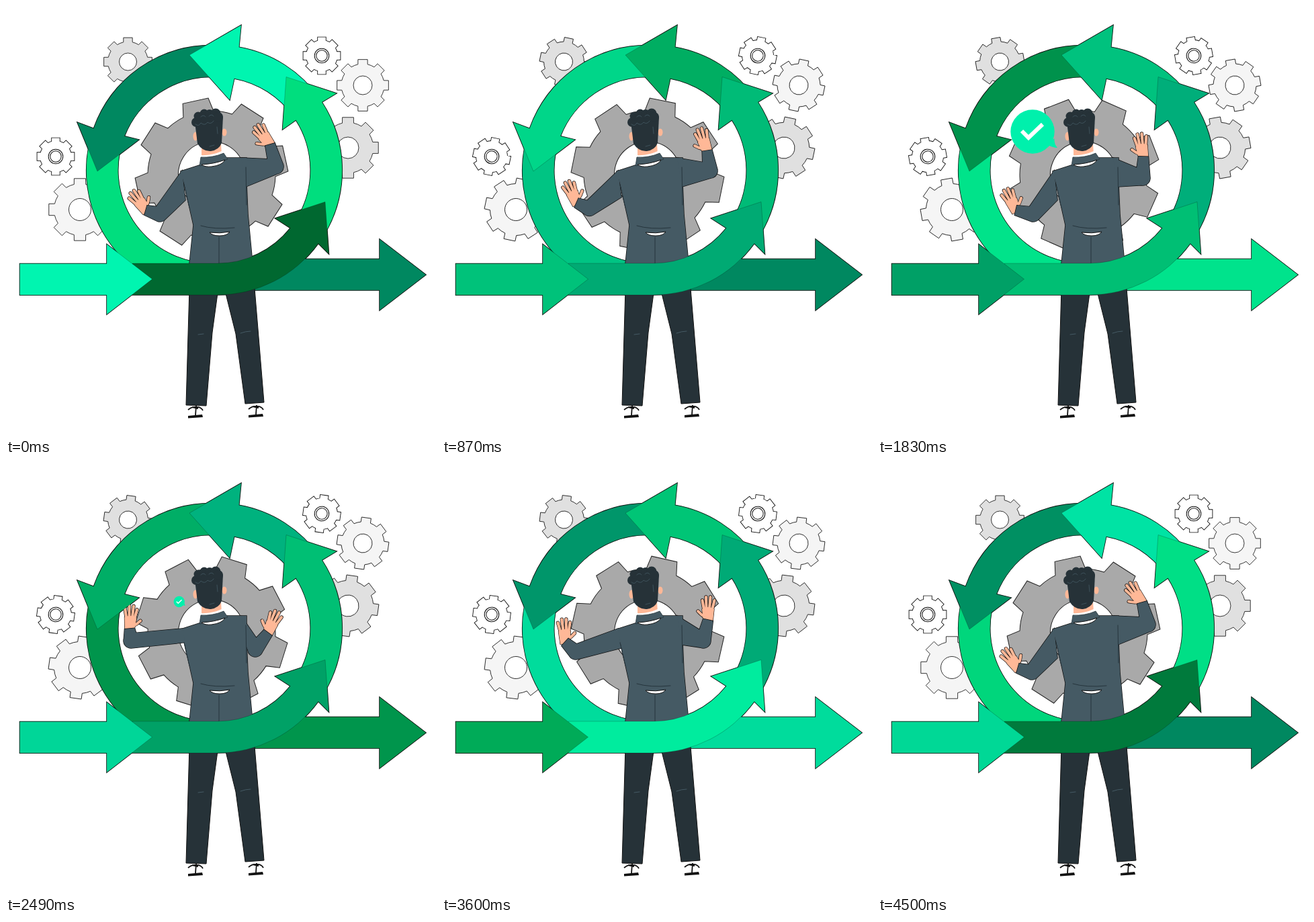
An HTML page for the animation above (4530 ms loop, 640x640 px).

```html
<!DOCTYPE html>
<html lang="en">
<head>
<meta charset="utf-8">
<title>Agile loop</title>
<style>
html, body { margin: 0; width: 100%; height: 100%; overflow: hidden; background: #fff; }
svg { display: block; width: 100vw; height: 100vh; }
.line { fill: none; stroke: #26353d; stroke-width: 1; stroke-linecap: round; }
.edge { fill: #111; stroke: #111; stroke-width: 1.5; stroke-linejoin: miter; }
.arrow { stroke: rgba(0, 0, 0, .3); stroke-width: .7; }
.suit { fill: #455a64; }
.skin { fill: #ffb897; stroke: #ffb897; }
.rim { fill: #111; stroke: #111; }
</style>
</head>
<body>
<svg viewBox="0 0 640 640">
  <defs>
    <path id="torso" d="M260 246 L288 237 L329 226 L358 226 L358 262 L360 310 L367 384 L273 384 L279 326 L266 268Z"/>
    <path id="armL"/>
    <path id="armR"/>
    <path id="palm" d="M-7 3 L7 3 L9 -16 Q0 -22 -9 -16Z"/>
    <path id="fingers" fill="none" stroke-linecap="round" stroke-linejoin="round"
      d="M-6 -15 L-9.5 -29 M-2 -17 L-3.5 -34 M2.5 -17 L3 -34 M6 -15 L8.5 -29 M4 -4 Q10 -7 15 -13"/>
    <g id="hand">
      <g class="rim"><use href="#palm" stroke-width="1.2"/><use href="#fingers" stroke-width="5.4"/></g>
      <g class="skin"><use href="#palm" stroke-width="0"/><use href="#fingers" stroke-width="4"/></g>
    </g>
    <g id="shoe">
      <path d="M-11 -8 Q-5 -13 0 -12 Q8 -13 11 -7 M1 -14 L0 0 M-5 -12 L4 -10" fill="none" stroke="#111" stroke-width="1.8"/>
      <path d="M-11 1 L10 -1 L11 3 L-11 4.5Z" fill="#111"/>
    </g>
  </defs>

  <g id="gears"></g>

  <g id="bubble">
    <path d="M-15 -5 Q-7 0 0 0 Q-5 -5 -4.5 -14Z" fill="#00f0ac"/>
    <circle cx="-37" cy="-24" r="32.7" fill="#00f0ac"/>
    <path d="M-53 -25 L-43 -15 L-22 -35" fill="none" stroke="#fff" stroke-width="6"/>
  </g>

  <g id="back"></g>

  <g id="man">
    <g fill="#263238" stroke="#111" stroke-width="1">
      <path d="M273 420 H316 L307 486 L298 595 L268 594Z"/>
      <path d="M325 420 H370 L384 590 L356 592 L342 488Z"/>
    </g>
    <path class="line" style="stroke:#455a64" d="M286 489 L294 488 M349 487 Q357 484 364 484"/>
    <use href="#shoe" x="282" y="609"/>
    <use href="#shoe" x="372" y="608"/>

    <use href="#hand" id="handL"/>
    <use href="#hand" id="handR"/>
    <g class="edge"><use href="#torso"/><use href="#armL"/><use href="#armR"/></g>
    <g class="suit"><use href="#torso"/><use href="#armL"/><use href="#armR"/></g>
    <path class="line" d="M265 266 Q269 285 273 300 M357 240 L358 296 M290 327 Q310 333 340 330 M317 344 L317 383"/>
    <path d="M303 337 Q318 339 333 336 Q329 342 318 342 Q307 342 303 337Z" fill="#fff" stroke="#111"/>

    <path d="M291 204 L320 204 L321 222 L291 226Z" fill="#ffb897"/>
    <path d="M289 222 Q306 223 321 216 L324 221 L288 230Z" fill="#fff"/>
    <path d="M290 225 Q308 226 324 219 L330 228 Q312 235 288 238Z" fill="#455a64" stroke="#26353d" stroke-width=".8"/>
    <path d="M291 236 Q310 235 326 229 Q322 237 306 239 Q296 240 291 236Z" fill="#fff" stroke="#111"/>
    <g fill="#ffb897">
      <ellipse cx="282" cy="194" rx="3.5" ry="6.5"/>
      <ellipse cx="325" cy="188" rx="3.5" ry="5.5"/>
    </g>
    <g fill="#263238">
      <path d="M281 172 L285 205 Q293 217 305 216 Q317 214 321 204 L323 165 Q318 154 308 156Z"/>
      <circle cx="283" cy="173" r="7"/><circle cx="286" cy="164" r="6.5"/>
      <circle cx="295" cy="160" r="6.5"/><circle cx="303" cy="161" r="7"/>
      <circle cx="312" cy="160" r="7.5"/><circle cx="316" cy="165" r="7"/>
    </g>
    <path class="line" style="stroke:#455a64;stroke-width:.8" d="M282 176 q5 4 8 -2 q6 5 10 -1 q5 4 9 -2 M290 165 q4 -4 7 0 M302 164 q4 -4 7 0 M314 180 L315 190 M303 209 L310 207"/>
  </g>

  <g id="front"></g>
</svg>

<script>
const LOOP = 4530, STEP = 30;
const TIMES = [0, 450, 1320, 1830, 2490, 3600, 4500];
const NS = 'http://www.w3.org/2000/svg';
const $ = id => document.getElementById(id);

function add(parent, tag, attrs) {
  const el = document.createElementNS(NS, tag);
  for (const k in attrs) el.setAttribute(k, attrs[k]);
  parent.appendChild(el);
  return el;
}

// Gears
function gearPath(R, root, tip, base) {
  const at = (r, deg) => {
    const a = deg * Math.PI / 180;
    return (r * Math.sin(a)).toFixed(2) + ' ' + (-r * Math.cos(a)).toFixed(2);
  };
  let d = '';
  for (let a = 0; a < 360; a += 45) {
    d += (a ? `A${root} ${root} 0 0 1 ` : 'M') + at(root, a - base) +
      'L' + at(R, a - tip) + 'L' + at(R, a + tip) + 'L' + at(root, a + base);
  }
  return d + `A${root} ${root} 0 0 1 ` + at(root, -base) + 'Z';
}

function addGear(x, y, R, hole, fill) {
  const g = add($('gears'), 'g', {});
  const d = gearPath(R, R * .82, 10.5, 13);
  if (fill) {
    add(g, 'path', { d, fill, stroke: '#222', 'stroke-width': .9 });
    add(g, 'circle', { r: hole, fill: '#fff', stroke: '#222', 'stroke-width': .9 });
  } else {
    for (const [stroke, w] of [['#111', 3.6], ['#fff', 1.8]]) {
      add(g, 'path', { d, fill: '#fff', stroke, 'stroke-width': w });
    }
    add(g, 'circle', { r: hole, fill: 'none', stroke: '#111', 'stroke-width': 3.6 });
    add(g, 'circle', { r: hole, fill: 'none', stroke: '#fff', 'stroke-width': 1.6 });
  }
  return { g, x, y };
}

const smallGears = [
  addGear(181.5, 83, 36.5, 13, '#e0e0e0'),
  addGear(509, 211, 46, 16, '#e0e0e0'),
  addGear(531, 118, 39, 14, '#f5f5f5'),
  addGear(110, 303, 47, 16.5, '#f5f5f5'),
  addGear(470, 74, 27, 9.5),
  addGear(74, 224, 27, 9.5)
];

const bigGear = add($('gears'), 'g', {});
add(bigGear, 'path', { d: gearPath(114, 95, 9.8, 14), fill: '#a9a9a9', stroke: '#222', 'stroke-width': 1 });
add(bigGear, 'circle', { r: 49.5, fill: '#fff', stroke: '#222', 'stroke-width': 1 });

// Arrows around the ring, which is two half circles set slightly apart
const LEFT_X = 305.5, RIGHT_X = 314.5, MID_Y = 244.3, OUTER = 185.8, INNER = 138.7;
function band(cx, from, outEnd, inEnd, head = '', tail = '') {
  const at = (deg, r) => {
    const a = deg * Math.PI / 180;
    return (cx + r * Math.cos(a)).toFixed(1) + ' ' + (MID_Y + r * Math.sin(a)).toFixed(1);
  };
  return 'M' + at(from, OUTER) + `A${OUTER} ${OUTER} 0 0 0 ` + at(outEnd, OUTER) + head +
    'L' + at(inEnd, INNER) + `A${INNER} ${INNER} 0 0 1 ` + at(from, INNER) + tail + 'Z';
}

const arrows = [
  { layer: 'back', d: band(LEFT_X, -169, -270, -270),
    c: 'de7e a265 e8a4 e38a 954c dc9c d67c' },
  { layer: 'back', d: 'M380 376.5 H556 V347 L625 400 L556 453 V423 H352Z',
    c: '8860 8860 e8a6 e8a6 e38c 954c 954c dc9c dc9c 8860',
    t: [0, 1110, 1290, 1320, 1830, 2490, 2730, 3240, 3600, 4500] },
  { layer: 'front', d: band(LEFT_X, -90, -160.5, -158.6, 'L106 173 L136 246 L198 199'),
    c: '8860 cf92 dd80 924c ae66 966a 9062' },
  { layer: 'front', d: band(RIGHT_X, -35, -80, -79.5, 'L350 28.5 L273 73 L333 140'),
    c: 'f5b0 e58c 7434 c27e b27e c576 e3a4' },
  { layer: 'front', d: band(RIGHT_X, 31, -33, -32.5, 'L492 130 L417 105.5 L411.5 184'),
    c: 'de7e 914a e9a8 ae7a bf74 aa76 df86' },
  { layer: 'front', d: band(RIGHT_X, 90, 36, 38.4, 'L480.5 369 L475 291.5 L400.5 316', 'H188V430.1'),
    c: '6830 c380 9066 bf74 a166 ec9e 7a3c' },
  { layer: 'front', d: 'M20.5 383.5 H150 V354.5 L217.5 406.5 L150 459 V430.3 H20.5Z',
    c: 'f5b0 ae79 d87c a066 d698 ab58 d896' }
];
for (const a of arrows) add($('back'), 'path', { d: a.d, class: 'edge' });
for (const a of arrows) {
  a.el = add($(a.layer), 'path', { d: a.d, class: 'arrow' });
  const hex = a.c.split(' ').map(s => parseInt(s, 16));
  a.green = hex.map(v => v >> 8);
  a.blue = hex.map(v => v & 255);
  a.t = a.t || TIMES;
}

// Key poses: elbow x, y, wrist x, y, hand tilt
const LEFT = [
  [229, 310, 208, 304, -36], [203, 293, 189, 281, -11], [240, 313, 214, 309, -39],
  [231, 310, 205, 304, -25], [186, 263, 184, 245, 5], [199, 280, 183, 265, -2]
];
const RIGHT = [
  [402, 239, 393, 206, -37], [398, 247, 395, 218, -15], [400, 244, 394, 212, -26],
  [394, 256, 395, 224, -10], [371, 276, 390, 251, 23], [389, 263, 396, 232, 0]
];
const BIG = [-12.3, 17.5, 3, 23.9, 17.5, 12.8];
const SMALL = [0, 13, 6, -10, 8, 7];

function find(times, t) {
  let i = 0;
  while (i < times.length - 2 && t >= times[i + 1]) i++;
  return [i, Math.min(1, (t - times[i]) / (times[i + 1] - times[i]))];
}
function linear(times, vals, t) {
  const [i, u] = find(times, t);
  return vals[i] + (vals[i + 1] - vals[i]) * u;
}

// Smooth periodic curve through the key poses
function smooth(vals, t) {
  const n = vals.length, end = TIMES[n];
  const v = i => vals[(i + n) % n];
  const at = i => TIMES[(i + n) % n] + Math.floor(i / n) * end;
  const slope = i => (v(i + 1) - v(i - 1)) / (at(i + 1) - at(i - 1));
  const [i, u] = find(TIMES, t);
  const h = TIMES[i + 1] - TIMES[i], u2 = u * u, u3 = u2 * u;
  return v(i) * (2 * u3 - 3 * u2 + 1) + v(i + 1) * (3 * u2 - 2 * u3) +
    h * (slope(i) * (u3 - 2 * u2 + u) + slope(i + 1) * (u3 - u2));
}
const pose = (keys, t) => keys[0].map((_, k) => smooth(keys.map(p => p[k]), t));

// Always clockwise, so that overlapping pieces merge
function poly(pts) {
  const area = pts.reduce((s, p, i) => {
    const q = pts[(i + 1) % pts.length];
    return s + p[0] * q[1] - q[0] * p[1];
  }, 0);
  if (area < 0) pts.reverse();
  return 'M' + pts.map(p => p[0].toFixed(1) + ' ' + p[1].toFixed(1)).join('L') + 'Z';
}
function sides(from, to, p, w) {
  const dx = to[0] - from[0], dy = to[1] - from[1], l = Math.hypot(dx, dy) || 1;
  const nx = -dy / l * w, ny = dx / l * w;
  return [[p[0] + nx, p[1] + ny], [p[0] - nx, p[1] - ny]];
}
function armPath(top, bottom, elbow, wrist) {
  const mid = [(top[0] + bottom[0]) / 2, (top[1] + bottom[1]) / 2];
  let [a, b] = sides(mid, elbow, elbow, 11);
  const cross = (elbow[0] - mid[0]) * (top[1] - mid[1]) - (elbow[1] - mid[1]) * (top[0] - mid[0]);
  if (cross < 0) [a, b] = [b, a];
  const [e1, e2] = sides(elbow, wrist, elbow, 11);
  const [w1, w2] = sides(elbow, wrist, wrist, 7.5);
  return poly([top, a, b, bottom]) + poly([e1, w1, w2, e2]) +
    `M${elbow[0] - 11} ${elbow[1]}a11 11 0 0 1 22 0a11 11 0 0 1 -22 0Z`;
}
// The armpit follows the elbow up and down by the factor lift
function setArm(side, keys, top, pit, lift, flip, t) {
  const [ex, ey, wx, wy, tilt] = pose(keys, t);
  const bottom = [pit[0], pit[1] + (ey - pit[1]) * lift];
  $('arm' + side).setAttribute('d', armPath(top, bottom, [ex, ey], [wx, wy]));
  $('hand' + side).setAttribute('transform', `translate(${wx} ${wy}) rotate(${tilt}) scale(${flip} 1)`);
}

function draw(t) {
  for (const a of arrows) {
    const g = Math.round(linear(a.t, a.green, t)), b = Math.round(linear(a.t, a.blue, t));
    a.el.setAttribute('fill', `rgb(0,${g},${b})`);
  }
  bigGear.setAttribute('transform', `translate(306 251) rotate(${smooth(BIG, t)})`);
  const turn = smooth(SMALL, t);
  for (const { g, x, y } of smallGears) {
    g.setAttribute('transform', `translate(${x} ${y}) rotate(${turn})`);
  }
  const size = linear([0, 1110, 1500, 2310, 2550, LOOP], [0, 0, 1, 1, 0, 0], t);
  $('bubble').setAttribute('transform', `translate(267 211) scale(${size})`);
  $('bubble').setAttribute('visibility', size > 0 ? 'visible' : 'hidden');
  setArm('L', LEFT, [262, 245], [267, 268], .5, 1, t);
  setArm('R', RIGHT, [350, 226], [357, 269], 0, -1, t);
}

const start = performance.now();
function tick() {
  const t = (performance.now() - start) % LOOP;
  draw(Math.floor(t / STEP) * STEP);
  requestAnimationFrame(tick);
}
tick();
</script>
</body>
</html>
```
